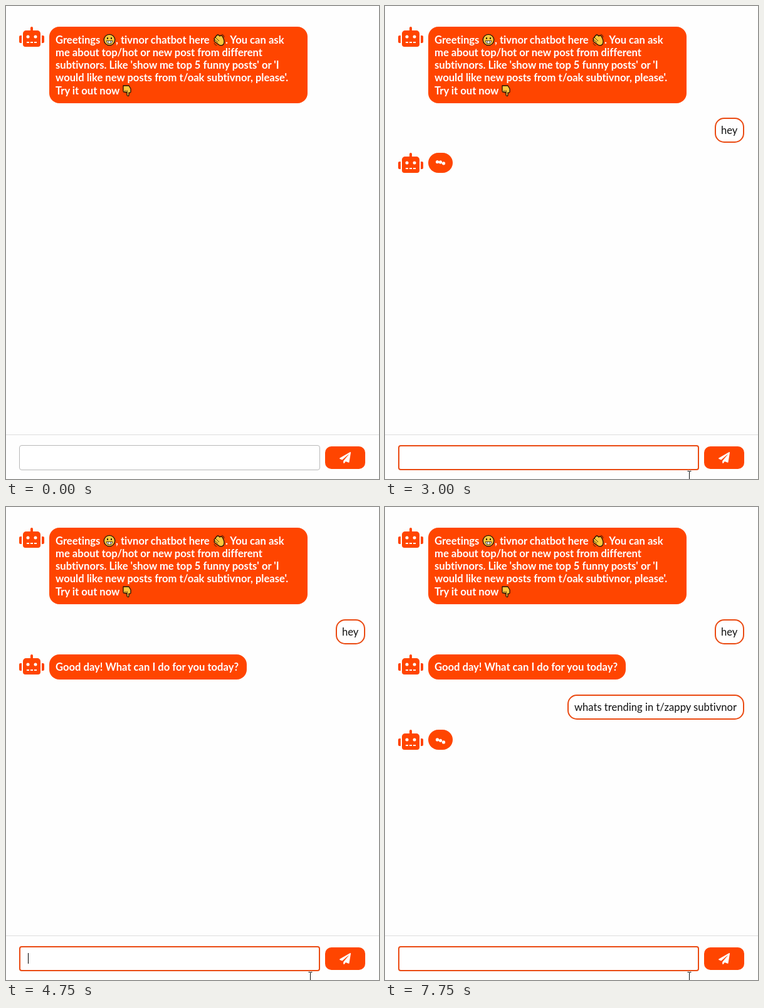
An HTML page for the animation above (8000 ms loop, 595 px wide and 754 px high).

```html
<!DOCTYPE html>
<html lang="en">
<head>
<meta charset="utf-8">
<title>Chatbot conversation</title>
<style>
  html, body { margin: 0; width: 100%; height: 100%; overflow: hidden; background: #fefefe; }
  svg { position: absolute; left: 0; top: 0; }
  svg text { font: 700 16.6px Lato, sans-serif; font-variant-ligatures: none; fill: #fff; white-space: pre; }
  svg .user text { font-weight: 400; fill: #111; }
  .bubble { fill: #ff4500; }
  .user rect { fill: #fff; stroke: #ea4a12; stroke-width: 2; }
  .emoji { fill: #ffc83d; stroke: #1c1208; stroke-width: 1.3; stroke-linejoin: round; }
  #field {
    position: absolute; left: 21px; top: 700px; width: 480px; height: 40px;
    box-sizing: border-box; border: 1px solid #b8b8b8; border-radius: 4px;
    background: #fff; padding-left: 13px; color: #222;
    font: 16px/38px "Liberation Sans", Arial, sans-serif; white-space: pre;
  }
  #field.focus { border: 2px solid #ea4a12; padding-left: 12px; line-height: 36px; }
  #typo { text-decoration: underline wavy #e33 1px; text-decoration-skip-ink: none; }
  #caret { display: inline-block; width: 1px; height: 17px; background: #000; vertical-align: -3px; }
</style>
</head>
<body>
<svg width="595" height="754" viewBox="0 0 595 754">
  <defs>
    <g id="robot">
      <path fill="#ff4500" d="M4 14v12H2a2 2 0 0 1-2-2v-8a2 2 0 0 1 2-2zM36 14h2a2 2 0 0 1 2 2v8a2 2 0 0 1-2 2h-2zM18 6V2a2 2 0 0 1 4 0v4h7a5 5 0 0 1 5 5v17a4 4 0 0 1-4 4H10a4 4 0 0 1-4-4V11a5 5 0 0 1 5-5z"/>
      <path fill="#fff" d="M12 24h4v2h-4zm6 0h4v2h-4zm6 0h4v2h-4z"/>
      <circle cx="14" cy="16" r="2.5" fill="#fff"/>
      <circle cx="26" cy="16" r="2.5" fill="#fff"/>
    </g>
  </defs>

  <use href="#robot" x="21" y="33"/>
  <rect class="bubble" x="69" y="33" width="412" height="122" rx="16"/>
  <text x="79" y="60">Greetings</text>
  <text x="175" y="60">, tivnor chatbot here</text>
  <text x="350" y="60">. You can ask</text>
  <text x="79" y="80">me about top/hot or new post from different</text>
  <text x="79" y="100">subtivnors. Like 'show me top 5 funny posts' or 'I</text>
  <text x="79" y="120">would like new posts from t/oak subtivnor, please'.</text>
  <text x="79" y="141">Try it out now</text>

  <g class="emoji" transform="translate(165 54)">
    <circle r="8.7"/>
    <path fill="#fff" stroke-width=".8" d="M-5 1.5H5Q4.5 6 0 6T-5 1.5zM-2 1.5v4M2 1.5v4"/>
    <path stroke-width="2" stroke-linecap="round" d="M-3-3v1M3-3v1"/>
  </g>
  <g class="emoji" transform="translate(340 54)">
    <path d="M-7-3-4-7Q-2-9 0-7L1-6Q3-8 5-6L7-2Q9 3 7 7 4 10 0 8L-7 3Q-9 1-7 0-9-2-7-3z"/>
    <path fill="none" stroke-width=".8" d="M-7 0-2 4M-6-4 0 2M4-9q4 1 4 5M-8 5q1 3 4 4"/>
  </g>
  <g class="emoji" transform="translate(193 135)">
    <path d="M-6-8H3L6-3V2Q5 4 3 3V7Q2 10 0 7V2Q-2 4-3 2-6 3-6 0z"/>
    <path fill="none" stroke-width=".8" d="M-3 2v-3M0 2v-3"/>
  </g>

  <g id="hey" class="user">
    <rect x="527" y="180" width="45" height="38" rx="14"/>
    <text x="536" y="205">hey</text>
  </g>
  <g id="reply">
    <use href="#robot" x="21" y="235"/>
    <rect class="bubble" x="69" y="235" width="315" height="40" rx="16"/>
    <text x="79" y="261">Good day! What can I do for you today?</text>
  </g>
  <g id="ask" class="user">
    <rect x="292" y="300" width="280" height="38" rx="14"/>
    <text x="302" y="325">whats trending in t/zappy subtivnor</text>
  </g>
  <g id="waiting">
    <use href="#robot" x="21"/>
    <rect class="bubble" x="69" width="39" height="32" rx="16"/>
    <g fill="#fff">
      <circle class="dot" cx="83.5" r="2.6"/>
      <circle class="dot" cx="88.5" r="2.6"/>
      <circle class="dot" cx="93.5" r="2.6"/>
    </g>
  </g>

  <path stroke="#ddd" d="M0 683.5h595"/>
  <rect class="bubble" x="509" y="702" width="64" height="36" rx="10"/>
  <path fill="#fff" transform="translate(532 711)" d="M17 .1.5 9.5q-1 .9 0 1.5l3.8 1.6L14.4 3.7q.5 0 .3.3L6.2 14.3v3q.6 1.2 1.5.4L9.9 15l4.5 1.8q.9.1 1.1-.6L18 1Q18-.2 17 .1z"/>
</svg>

<div id="field"><span id="typed"></span><span id="typo"></span><span id="caret"></span></div>

<svg width="595" height="754" viewBox="0 0 595 754">
  <path id="cursor" fill="none" stroke="#111" d="M-3-7.5h2.5l.5.5.5-.5H3M0-7V7M-3 7.5h2.5L0 7l.5.5H3"/>
</svg>

<script>
const LOOP = 8000, STEP = 250, BLINK = 530;
const SEND_HEY = 2500, REPLY = 3250, SEND_ASK = 7000;
const $ = id => document.getElementById(id);
const dots = document.querySelectorAll(".dot");

// Each entry: start time, text, misspelt ending
const typing = [
  [0, "", ""], [1750, "h", ""], [2000, "he", ""], [2250, "hey", ""], [SEND_HEY, "", ""],
  [5250, "whats trending in t/zappy ", "subtivnor"], [SEND_ASK, "", ""]
];
// Moments at which the caret starts a new blink
const blinkStarts = [700, 1760, 2000, 2250, 2400, 5100, 6960];
const cursorPath = [[250, 508, 748], [500, 490, 726], [750, 485, 749]];

const latest = (list, t, key) => list.filter(item => key(item) <= t).pop();
const slide = age => -Math.floor(4 * 0.5 ** (age / STEP));

function place(id, visible, y = 0) {
  $(id).setAttribute("visibility", visible ? "visible" : "hidden");
  $(id).setAttribute("transform", `translate(0 ${y})`);
}

function drawWaiting(t) {
  const second = t >= SEND_ASK;
  const age = t - (second ? SEND_ASK : SEND_HEY);
  place("waiting", second || (age >= 0 && t < REPLY), (second ? 355 : 235) + slide(age));
  dots.forEach((dot, i) => {
    const phase = Math.max(0, age - 250) / 500 * (1.2 + 0.45 * i * i);
    dot.setAttribute("cy", 17 - 3 * Math.cos(phase));
  });
}

function drawField(t) {
  const [, text, typo] = latest(typing, t, item => item[0]);
  $("typed").textContent = text;
  $("typo").textContent = typo;
  $("field").className = t >= 750 ? "focus" : "";
  const start = latest(blinkStarts, t, time => time);
  const lit = start !== undefined && Math.floor((t - start) / BLINK) % 2 === 0;
  $("caret").style.visibility = lit ? "visible" : "hidden";
}

function drawCursor(t) {
  const spot = latest(cursorPath, t, item => item[0]);
  $("cursor").setAttribute("visibility", spot ? "visible" : "hidden");
  if (spot) $("cursor").setAttribute("transform", `translate(${spot[1] + 0.5} ${spot[2]})`);
}

function draw(now) {
  const time = now % LOOP, t = time - time % STEP;
  place("hey", t >= SEND_HEY, slide(t - SEND_HEY));
  place("reply", t >= REPLY, Math.min(0, -6 + Math.max(0, t - 4000) / 125));
  place("ask", t >= SEND_ASK, slide(t - SEND_ASK));
  drawWaiting(t);
  drawField(t);
  drawCursor(t);
  requestAnimationFrame(draw);
}
requestAnimationFrame(draw);
</script>
</body>
</html>
```
